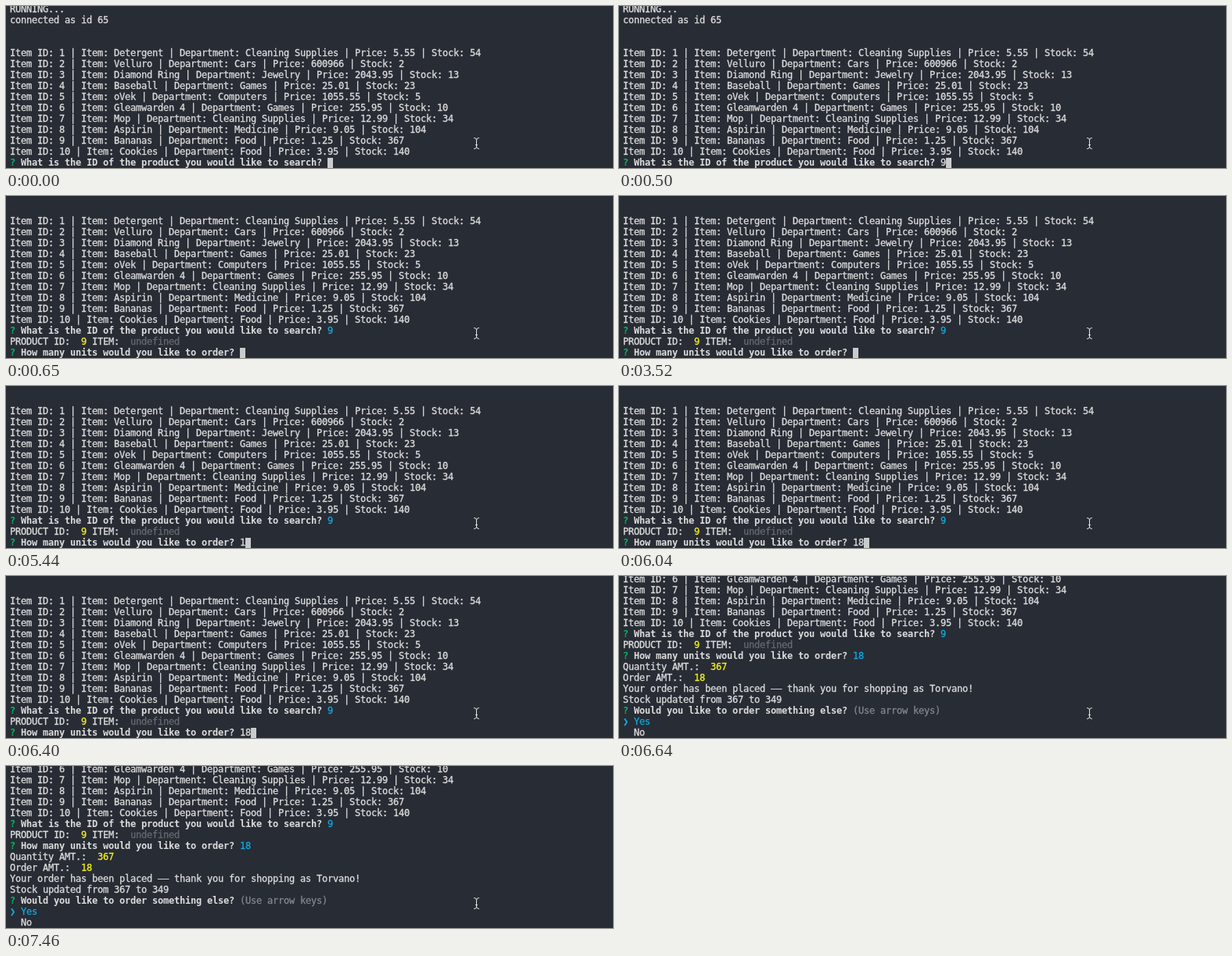
These frames come from a looping animation (776x207 px, 8 s). An HTML page:

```html
<!DOCTYPE html>
<html lang="en">
<head>
<meta charset="utf-8">
<title>Store terminal</title>
<style>
  html, body { margin: 0; width: 100%; height: 100%; overflow: hidden; background: #282c34; }
  #stage { position: relative; width: 776px; height: 207px; overflow: hidden; background: #282c34; }
  .line, #probe {
    position: absolute; left: 5px; height: 14px; white-space: pre;
    font: 12px/14px "DejaVu Sans Mono", monospace; color: #dcdcdc;
    -webkit-text-stroke: 0.3px;
  }
  #probe { visibility: hidden; }
  b { -webkit-text-stroke: 0; }
  .green { color: #00b866; }
  .cyan { color: #12a8de; }
  .yellow { color: #f4f01c; }
  .gray { color: #666a70; }
  .hint { color: #83878d; }
  .cursor {
    display: inline-block; position: relative; top: 1px; vertical-align: top;
    width: 7px; height: 14px; background: #c9cbcd;
  }
  svg { position: absolute; left: 597px; top: 167px; }
</style>
</head>
<body>
<div id="stage">
  <span id="probe"></span>
  <div id="screen"></div>
  <svg width="10" height="18" fill="none" stroke="#e8e8e8" stroke-linecap="round">
    <path d="M1.5 1.5Q4.5 1.5 4.5 4V13Q4.5 15.5 1.5 15.5M7.5 1.5Q4.5 1.5 4.5 4M4.5 13Q4.5 15.5 7.5 15.5M3.5 10.5H5.5"/>
  </svg>
</div>
<script>
const LOOP = 8000, ROW = 14, CELL = 7, TOP = -3;
const screen = document.getElementById('screen');

const paint = (color, text) => `<span class="${color}">${text}</span>`;
const ask = text => `<b>${paint('green', '?')} ${text}</b> `;
const cursor = '<span class="cursor"></span>';

const items = [
  ['Detergent', 'Cleaning Supplies', '5.55', 54],
  ['Velluro', 'Cars', '600966', 2],
  ['Diamond Ring', 'Jewelry', '2043.95', 13],
  ['Baseball', 'Games', '25.01', 23],
  ['oVek', 'Computers', '1055.55', 5],
  ['Gleamwarden 4', 'Games', '255.95', 10],
  ['Mop', 'Cleaning Supplies', '12.99', 34],
  ['Aspirin', 'Medicine', '9.05', 104],
  ['Bananas', 'Food', '1.25', 367],
  ['Cookies', 'Food', '3.95', 140]
].map(([name, dept, price, stock], i) =>
  `Item ID: ${i + 1} | Item: ${name} | Department: ${dept} | Price: ${price} | Stock: ${stock}`);

const askId = ask('What is the ID of the product you would like to search?');
const askUnits = ask('How many units would you like to order?');
const chosen = [
  askId + paint('cyan', '9'),
  `PRODUCT ID:  ${paint('yellow', '9')} ITEM:  ${paint('gray', 'undefined')}`
];

const search = typed => ['RUNNING...', 'connected as id 65', '', '', ...items, askId + typed + cursor];
const order = typed => ['', '', ...items, ...chosen, askUnits + typed + cursor];
const done = [
  ...items.slice(5), ...chosen,
  askUnits + paint('cyan', '18'),
  `Quantity AMT.:  ${paint('yellow', '367')}`,
  `Order AMT.:  ${paint('yellow', '18')}`,
  'Your order has been placed —— thank you for shopping as Torvano!',
  'Stock updated from 367 to 349',
  ask('Would you like to order something else?') + paint('hint', '(Use arrow keys)'),
  paint('cyan', '❯ Yes'),
  '  No'
];

const steps = [
  [0, search('')],
  [500, search('9')],
  [650, order('')],
  [5440, order('1')],
  [6040, order('18')],
  [6640, done]
];

// Snap the font to the terminal's whole-pixel cell width.
const probe = document.getElementById('probe');
probe.textContent = '0'.repeat(100);
screen.style.letterSpacing = `${CELL - probe.getBoundingClientRect().width / 100}px`;
probe.remove();

let shown;
function draw() {
  const time = performance.now() % LOOP;
  const lines = steps.findLast(([start]) => start <= time)[1];
  if (lines !== shown) {
    shown = lines;
    screen.innerHTML = lines.map((line, i) =>
      `<div class="line" style="top:${TOP + i * ROW}px">${line}</div>`).join('');
  }
  requestAnimationFrame(draw);
}
draw();
</script>
</body>
</html>
```
